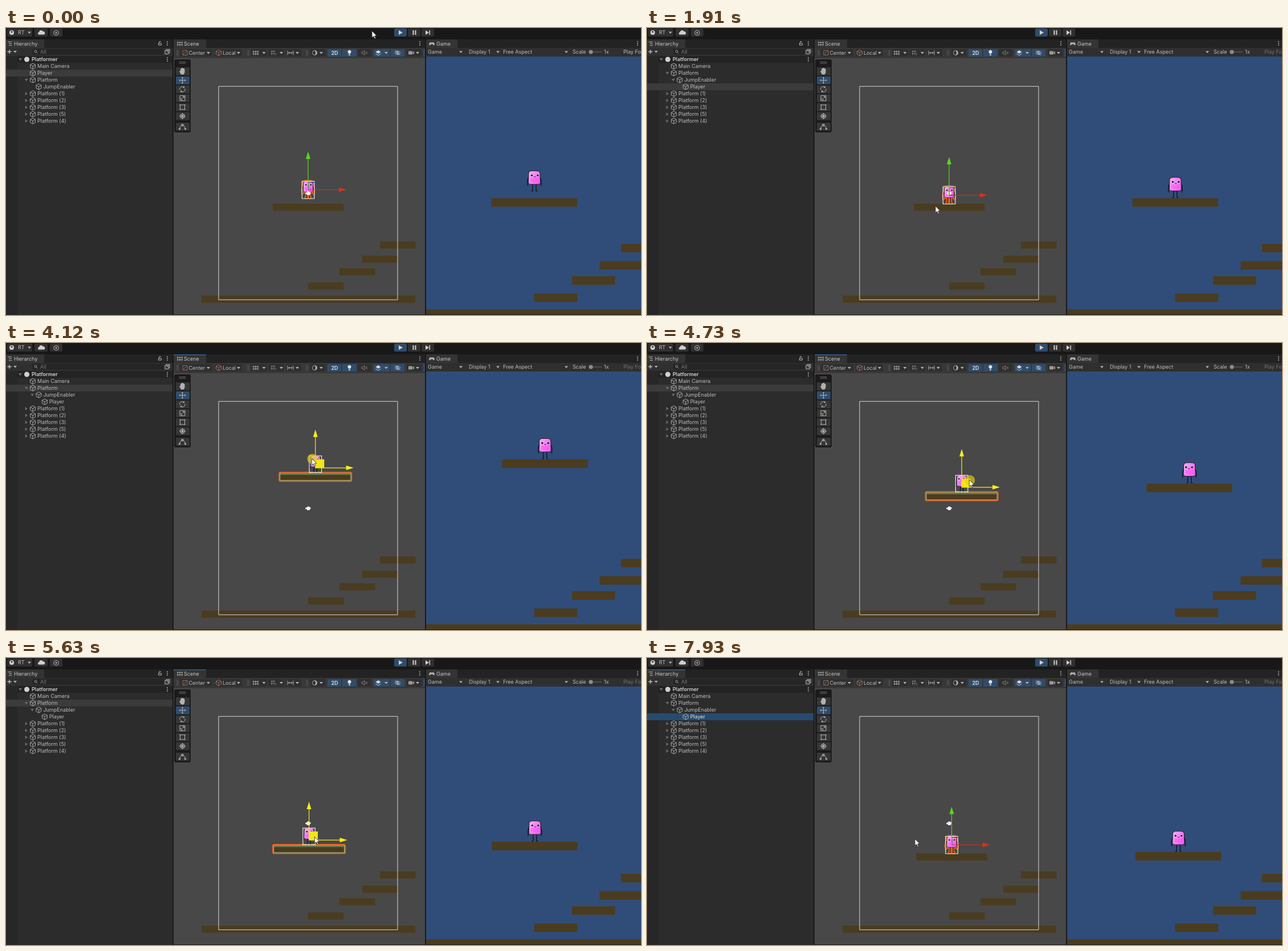
Write an HTML page with a canvas that moves like this. It is 1114 px wide and 503 px high and loops after 8 s.

```html
<!DOCTYPE html>
<html lang="en">
<head>
<meta charset="utf-8">
<title>Platformer editor</title>
<style>
html, body { margin: 0; width: 100%; height: 100%; overflow: hidden; background: #191919; }
canvas { display: block; }
</style>
</head>
<body>
<canvas id="stage" width="1114" height="503"></canvas>
<script>
const g = document.getElementById('stage').getContext('2d');
const LOOP = 8000, FALL = 510, LANDED = 700, PARENTED = 900;
const PICK_PLATFORM = 2500, DRAG = 3830, RELEASE = 5900, PICK_PLAYER = 6500;
const CURSOR_LEAD = 40, GAME_LAG = 12, ZOOM = 1.21;
const BLUE = '#304c6b', ICON = '#b4b4b4', TEXT = '#bdbdbd', WOOD = '#4a3c20';

// key points: time, x, y
const dragPath = [
  [DRAG, 0, 0], [4000, 34, -62], [4120, 13, -80], [4250, -22, -112], [4330, 2, -142], [4590, 5, 11],
  [4730, 22, -46], [4860, 42, -50], [5200, -27, 8], [5630, 1.5, 20], [5760, 12, 28], [RELEASE, 4.5, 34.5]
];
const cursorPath = [
  [PARENTED, 642, 5], [1640, 508, 329], [1910, 506, 312], [PICK_PLATFORM, 506, 312], [2930, 60, 96.5],
  [3180, 110, 62], [3760, 536, 291], [RELEASE, 540, 326], [6260, 70, 101], [PICK_PLAYER, 70, 101],
  [7090, 334, 92], [7500, 410, 412], [7860, 470, 317]
];

// Smooth curve through the keys, at rest wherever a coordinate turns or holds
function follow(keys, t) {
  const last = keys.length - 1;
  if (t <= keys[0][0]) return keys[0].slice(1);
  if (t >= keys[last][0]) return keys[last].slice(1);
  const i = keys.findIndex(k => k[0] > t), a = keys[i - 1], b = keys[i];
  const span = b[0] - a[0], s = (t - a[0]) / span;
  const slope = (n, c) => {
    if (n === 0 || n === last) return 0;
    const p = keys[n - 1], k = keys[n], q = keys[n + 1];
    return (k[c] - p[c]) * (q[c] - k[c]) > 0 ? (q[c] - p[c]) / (q[0] - p[0]) : 0;
  };
  return [1, 2].map(c => a[c] + (b[c] - a[c]) * s * s * (3 - 2 * s)
    + span * s * (1 - s) * (slope(i - 1, c) * (1 - s) - slope(i, c) * s));
}

function box(x, y, w, h, fill, r = 0) {
  g.fillStyle = fill;
  g.beginPath();
  g.roundRect(x, y, w, h, r);
  g.fill();
}
function frame(x, y, w, h, color, width = 1, r = 0) {
  g.strokeStyle = color;
  g.lineWidth = width;
  g.beginPath();
  g.roundRect(x, y, w, h, r);
  g.stroke();
}
function path(d, x, y, color = ICON, width = 1, fill) {
  const p = new Path2D(d);
  g.save();
  g.translate(x, y);
  if (fill) { g.fillStyle = fill; g.fill(p); }
  if (width) { g.strokeStyle = color; g.lineWidth = width; g.stroke(p); }
  g.restore();
}
const solid = (d, x, y, color = ICON) => path(d, x, y, color, 0, color);
function dot(x, y, r, color) {
  g.fillStyle = color;
  g.beginPath();
  g.arc(x, y, r, 0, 7);
  g.fill();
}
function label(s, x, y, color = TEXT, weight = 400) {
  g.font = `${weight} 9px Inter, sans-serif`;
  g.fillStyle = color;
  g.fillText(s, x, y + 3.4);
}
const caret = (x, y) => solid('M-3-1.5H3L0 2Z', x, y);
const menuDots = (x, y) => [-3, 0, 3].forEach(d => dot(x, y + d, .9, ICON));

const CUBE = 'M0-5L4.5-2.6V2.6L0 5L-4.5 2.6V-2.6ZM-4.5-2.6L0 0L4.5-2.6M0 0V5';
const CLOUD = 'M-5 3.5A2.5 2.5 0 0 1-4-1A3.6 3.6 0 0 1 2.8-2A2.8 2.8 0 0 1 4 3.5Z';
const EYE = 'M-5 0Q0-6 5 0Q0 6-5 0ZM-1.5 0A1.5 1.5 0 1 0 1.5 0A1.5 1.5 0 1 0-1.5 0';
const HAND = 'M-2 5L-5 0L-3 0V-4H-1.5V-5.5H.5V-5H2V-4H3.5V2L2 5Z';
const GRID = 'M-4-4V4M0-4V4M4-4V4M-5-2H5M-5 2H5';
const RING = 'M-4 0A4 4 0 1 0 4 0A4 4 0 1 0-4 0';
const ARROW = 'M0 0V12L2.8 9.4L4.8 13.6L6.6 12.8L4.7 8.8H8.4Z';

function topButton(x, w, icon, iconX, fill = '#303030') {
  box(x, 1, w, 14, fill, 2);
  solid(icon, iconX, 8, '#d0d0d0');
}
function topBar() {
  box(0, 0, 1114, 20, '#181818');
  topButton(2, 44, RING, 10);
  dot(10, 6.8, 1.5, '#303030');
  label('RT', 21, 8);
  caret(41, 8);
  topButton(50, 23, CLOUD, 62);
  topButton(77, 22, '', 88);
  path('M0-4.5L4-2.3V2.3L0 4.5L-4 2.3V-2.3Z', 88, 8.5);
  dot(88, 8.5, 1.4, ICON);
  topButton(681, 22, 'M-3-4L4 0L-3 4Z', 692, BLUE);
  topButton(705, 22, 'M-3-4H-1V4H-3ZM1-4H3V4H1Z', 716.5);
  topButton(729, 22, 'M-4-4L2 0L-4 4ZM2.5-4H4V4H2.5Z', 740);
}

function tabStrip(x, w, tabWidth, name, textX, focused, menuX) {
  box(x, 20, w, 15, '#232323');
  box(x, 20, tabWidth, 15, '#343434');
  if (focused) box(x, 20, tabWidth, 1.2, '#39699a');
  label(name, textX, 27.5, '#c6c6c6');
  menuDots(menuX, 27);
}

function hierarchy(t, cursor) {
  const focused = t >= PICK_PLAYER;
  box(0, 20, 292, 483, '#2c2c2c');
  tabStrip(0, 292, 67, 'Hierarchy', 14, focused, 283);
  path('M0-3H7M2 0H7M2 3H7', 3, 27.5);
  path('M-2.5 0H2.5V3H-2.5ZM-1.5 0V-2A1.5 1.5 0 0 1 1.5-2', 270, 27);
  box(0, 35, 292, 14, '#303030');
  path('M-3.5 0H3.5M0-3.5V3.5', 6, 41.5, '#c4c4c4', 1.3);
  caret(16, 41.5);
  box(46, 36.5, 231, 10, '#252525', 3);
  path('M-2 0A2 2 0 1 0 2 0A2 2 0 1 0-2 0M1.5 1.5L3.5 3.5', 52, 41, '#999');
  label('All', 60, 41.5, '#777');
  path('M-4-2H2V4H-4ZM-2-2V-4H4V2H2M-1 1L3-3', 283, 41.5);

  box(0, 49, 20, 454, '#272727');
  box(20, 49, 272, 12, '#232323');
  // name, depth, fold: 1 open, 2 closed
  const rows = [['Main Camera', 0], ['Platform', 0, 1]];
  if (t < PARENTED) rows.splice(1, 0, ['Player', 0]);
  rows.push(['JumpEnabler', 1, t < PARENTED ? 0 : 1]);
  if (t >= PARENTED) rows.push(['Player', 2]);
  for (const n of [1, 2, 3, 5, 4]) rows.push([`Platform (${n})`, 0, 2]);

  const picked = t >= PICK_PLATFORM && !focused ? 'Platform' : 'Player';
  const hovered = cursor[0] < 292 ? Math.floor((cursor[1] - 61) / 12) : -1;
  solid('M-3-2H3L0 2.5Z', 25, 55, '#707070');
  dot(36.5, 55, 4.5, '#d0d0d0');
  label('Platformer', 45, 55, '#d0d0d0', 600);
  menuDots(283, 55);
  rows.forEach(([name, depth, fold], i) => {
    const x = 47 + depth * 10.4, y = 67 + i * 12, selected = name === picked;
    if (selected) box(0, y - 6, 292, 12, focused ? '#264b70' : '#3b3b3b');
    if (i === hovered) {
      if (!selected) box(0, y - 6, 292, 12, '#363636');
      path(EYE, 4, y, '#666', .9);
      solid(HAND, 15, y, '#666');
    }
    if (fold) solid(fold === 1 ? 'M-3-2H3L0 2.5Z' : 'M-2-3V3L2.5 0Z', x - 11.3, y, '#686868');
    path(CUBE, x, y, ICON, .9);
    label(name, x + 8, y, focused && selected ? '#e4e4e4' : TEXT);
  });
}

// arrowX is where the drop-down caret sits, if there is one
function toolButton(x, w, icon, iconX, arrowX, on = false, color = on ? '#d8d8d8' : ICON) {
  box(x, 37, w, 13, on ? BLUE : '#2f2f2f', 1);
  path(icon, iconX, 43.5, color, .9);
  if (arrowX) caret(arrowX, 43.5);
}
function sceneChrome(t) {
  tabStrip(294, 441, 57, 'Scene', 312, t >= PICK_PLATFORM && t < PICK_PLAYER, 726);
  path(GRID, 305, 27.5, ICON, .8);
  box(294, 35, 441, 18, '#383838');
  for (const x of [300, 424, 527]) path('M0-5V5M2-5V5', x, 43.5, '#555');
  toolButton(305, 57, 'M-4-4H4V4H-4ZM-3 3L3-3', 314, 355, false, '#a07468');
  label('Center', 320.5, 43.5);
  toolButton(366, 48, CUBE, 373, 408, false, '#b07868');
  label('Local', 380, 43.5);
  toolButton(430, 28, GRID, 438, 452.5);
  toolButton(460, 28, 'M-4-3H3M-4 1H0M-3-4V4M1-4V0M1 4A2 2 0 1 1 4 4', 469, 483, false, '#8a8a8a');
  toolButton(491, 27, 'M-5-4V4M5-4V4M-5 0H5M-2-2V2M2-2V2', 499, 511);
  toolButton(534, 26, RING, 541.5, 553);
  solid('M0-4A4 4 0 0 1 0 4Q3 0 0-4', 541.5, 43.5);
  toolButton(564, 24, '', 576, 0, true);
  label('2D', 570.5, 43.5, '#e0e0e0', 600);
  toolButton(590, 25, '', 602, 0, true);
  solid('M-1.5 2Q-4-1-2.5-3A3 3 0 0 1 2.5-3Q4-1 1.5 2ZM-1.3 3H1.3V5H-1.3Z', 602.5, 43, '#e0e0e0');
  toolButton(617, 24, 'M-4-1.5H-2L1-4V4L-2 1.5H-4ZM3-2L6 2M6-2L3 2', 628, 0, false, '#8a8a8a');
  toolButton(645, 28, 'M-4.5 1.5L0 4.5L4.5 1.5', 653, 667, true);
  solid('M-4.5-1L0-4L4.5-1L0 2Z', 653, 43, '#d8d8d8');
  toolButton(675, 24, EYE + 'M-4-4L4 4', 687, 0, true);
  toolButton(703, 26, '', 711, 722);
  solid('M-5-3H2V3H-5ZM2.5-1L5-3V3L2.5 1Z', 711, 43.5, '#999');
  toolButton(732, 3, '', 733, 0, true);
}

function toolPalette() {
  box(295, 55, 29, 128, '#1b1b1b', 3);
  path('M-6-1H6M-6 1.5H6', 309.5, 60.5, '#777', .9);
  const icons = [
    HAND,
    'M-5.5 0H5.5M0-5.5V5.5M-4-1.5L-5.5 0L-4 1.5M4-1.5L5.5 0L4 1.5M-1.5-4L0-5.5L1.5-4M-1.5 4L0 5.5L1.5 4',
    'M-4.5 1A4.5 4.5 0 0 1 3-3.5M4.5-1A4.5 4.5 0 0 1-3 3.5M3-5.5V-3H.5M-3 5.5V3H-.5',
    'M-4.5-4.5H4.5V4.5H-4.5ZM-4.5 1H-1V4.5M0 0L3-3M.5-3H3V-.5',
    'M-4-4H4V4H-4ZM-5.5-4H-3M3-4H5.5M-5.5 4H-3M3 4H5.5',
    RING + 'M-5.5 0H5.5M0-5.5V5.5M-3-3L3 3M3-3L-3 3',
    'M-5 4Q-4-2 0-3Q4-2 5 4M-1.5-4.5H1.5V-1.5H-1.5ZM-6 3H-4V5H-6ZM4 3H6V5H4Z'
  ];
  icons.forEach((d, i) => {
    const y = i === 6 ? 173 : 76 + i * 15.7;
    box(298, y - 7, 24, 14, i === 1 ? BLUE : '#363636', 1);
    path(d, 309.5, y, '#c0c0c0', .9, i ? undefined : '#b0b0b0');
  });
}

function gameChrome(t) {
  tabStrip(737, 377, 55, 'Game', 755, false, 1108);
  solid('M-5 2Q-4-4-1-2H1Q4-4 5 2Q3 4 2 1H-2Q-3 4-5 2', 747, 27.5);
  box(737, 35, 377, 15, '#2f2f2f');
  label('Game', 740, 42);
  caret(798, 42);
  label('Display 1', 812, 42);
  caret(863, 42);
  label('Free Aspect', 872, 42);
  caret(983, 42);
  label('Scale', 994, 42);
  box(1023, 41.3, 22, 1.4, '#5a5a5a');
  dot(1026, 42, 3.6, '#8c8c8c');
  label('1x', 1049, 42);
  label('Play Focused', 1083, 42, t < FALL ? TEXT : '#707070');
}

const BODY = 'M-10 5Q-10 1-6 .6Q0 0 6 .6Q10 1 10 5L10.5 21Q10 24 5 24H-5Q-10 24-10.5 21Z';
const LIMBS = 'M-3 24V35.5H-5M3 24V35.5H5M-10.5 12Q-13 18-11.5 26M10.5 12Q13 18 11.5 26';

// x is the centre line, y the top of the head
function character(x, y, t, selected) {
  const look = .7 * Math.cos(t / 300);
  g.save();
  g.translate(x, y);
  g.scale(.83, .83);
  g.lineJoin = g.lineCap = 'round';
  if (selected) {
    path(LIMBS, 0, 0, '#f06a20', 5.5);
    path(BODY, 0, 0, '#f06a20', 5);
  }
  path(LIMBS, 0, 0, '#14141c', 1.4);
  const pink = g.createLinearGradient(-10, 0, 10, 10);
  pink.addColorStop(0, '#fbaef8');
  pink.addColorStop(1, '#f068f0');
  path(BODY, 0, 0, '#2a1830', 1, pink);
  solid('M-7 13H7V20H-7Z', 0, 0, 'rgba(255,80,250,.5)');
  for (const side of [-5.2, 5.2]) {
    dot(side + look, 8, 2.2, '#f4e8f4');
    dot(side + look, 8.2, 1.7, '#0c0c10');
  }
  path('M-1.6 10.5Q0 12.4 1.6 10.5', look, 0, '#301030', .9);
  g.restore();
}

function gizmo(x, y, dragging) {
  const up = dragging ? '#f6ee18' : '#58d818', right = dragging ? '#f6ee18' : '#d8321a';
  if (dragging) box(x, y - 15, 15.5, 15, '#f2e616');
  else frame(x + .5, y - 13, 13, 13, '#2b46a8');
  path('M0 0V-55', x, y, up, 1.2);
  path('M0 0H55', x, y, right, 1.2);
  solid('M0-67L4-54H-4Z', x, y, up);
  solid('M67 0L54-4V4Z', x, y, right);
}

const platform = (x, y, w = 62.5, h = 12.4) => box(x, y, w, h, WOOD);
function playerTop(t) {
  const drop = Math.min(Math.max((t - FALL) / (LANDED - FALL), 0), 1);
  return 277.5 - 9.5 * (1 - drop * drop);
}
function world(t, dx, dy) {
  platform(656, 374);
  platform(625, 399);
  platform(585, 421);
  platform(530, 446);
  platform(343, 469, 375);
  platform(468 + dx, 308 + dy, 124.2);
}

function sceneView(t) {
  const [dx, dy] = follow(dragPath, t);
  const x = 530 + dx, y = playerTop(t) + dy;
  const platformPicked = t >= PICK_PLATFORM && t < PICK_PLAYER;
  box(294, 53, 441, 449, '#484848');
  world(t, dx, dy);
  frame(373, 102.3, 314, 374, '#d6d6d6');
  if (platformPicked) {
    frame(466.5 + dx, 307 + dy, 127, 15.5, '#ee5f22', 2, 2);
    frame(468 + dx, 308.5 + dy, 124, 12.5, '#9ac486');
    path('M0 0H124', 468 + dx, 310.5 + dy, '#72b07c');
  }
  character(x, y, t, !platformPicked);
  frame(x - 10.7, y + .5, 21.5, platformPicked ? 29 : 30.5, '#e8ece4', 1.2);
  solid('M-5 1Q-5-2-2-2Q-1-5 2-3Q5-2 5 0L3 1V3H-2V1.5Z', 530, 290, '#f6eef4');
  gizmo(x, platformPicked ? 299 + dy : y + 15.5, t >= DRAG && t < RELEASE);
}

function gameView(t) {
  const [dx, dy] = follow(dragPath, t - GAME_LAG);
  box(737, 50, 377, 452, '#304d79');
  g.save();
  g.beginPath();
  g.rect(737, 50, 377, 452);
  g.clip();
  g.translate(851.5, 298.3);
  g.scale(ZOOM, ZOOM);
  g.translate(-468, -308);
  world(t, dx, dy);
  character(530.3 + dx, playerTop(t) + dy, t, false);
  g.restore();
}

function cursorAt(t) {
  if (t < DRAG || t >= RELEASE) return follow(cursorPath, t);
  const [dx, dy] = follow(dragPath, t + CURSOR_LEAD);
  return [536 + dx, 291 + dy];
}

function render(t) {
  const cursor = cursorAt(t);
  box(0, 0, 1114, 503, '#191919');
  topBar();
  hierarchy(t, cursor);
  sceneView(t);
  sceneChrome(t);
  toolPalette();
  gameView(t);
  gameChrome(t);
  if (t >= DRAG && t < 5560) dot(cursor[0] + 1, cursor[1] + 1, 9, 'rgba(232,208,20,.65)');
  path(ARROW, ...cursor, '#222', .8, '#fff');
}

function tick() {
  render(performance.now() % LOOP);
  requestAnimationFrame(tick);
}
tick();
</script>
</body>
</html>
```
